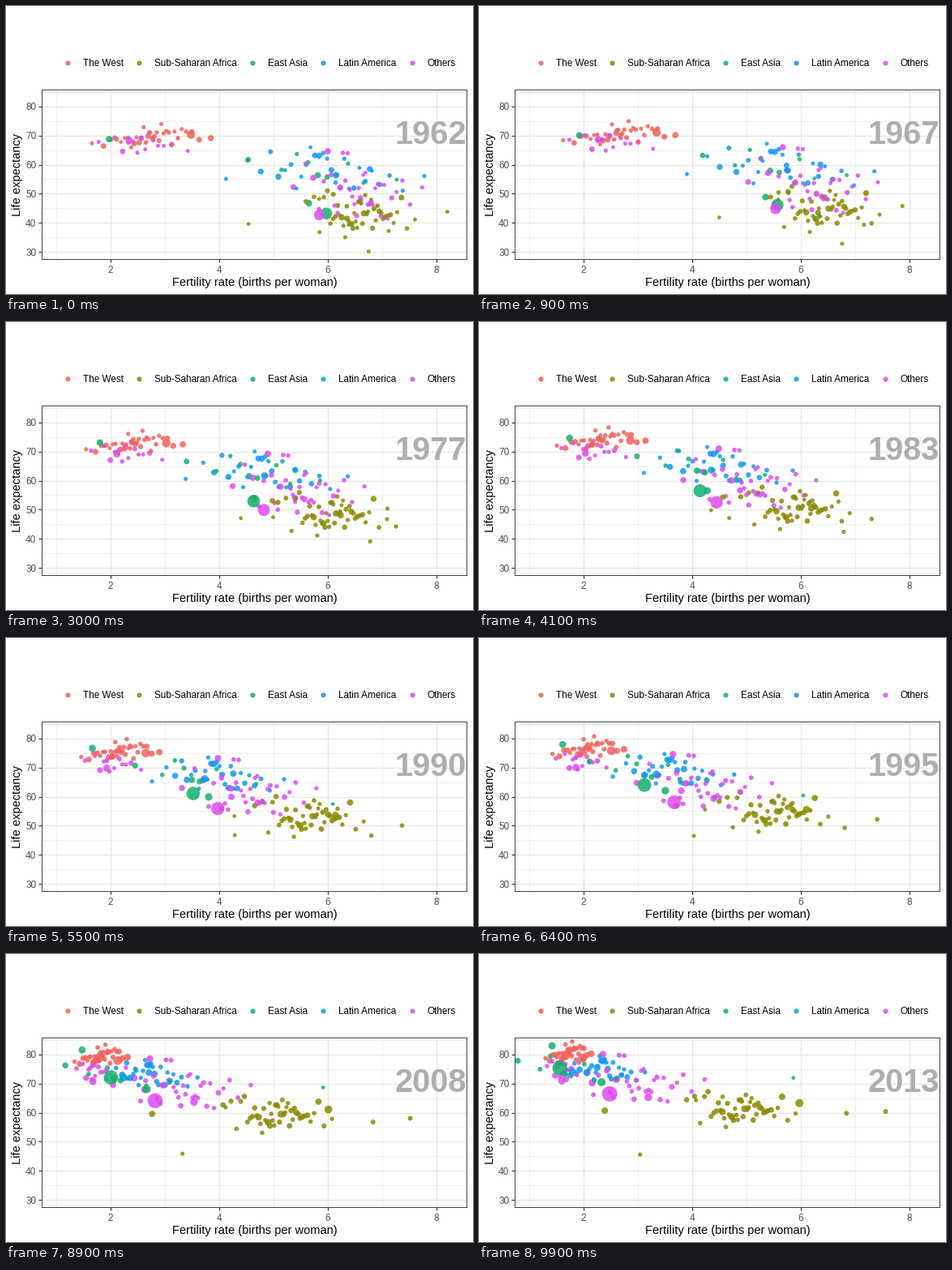
Recreate the animation shown at these times as a matplotlib script. Size 576x355 px, loop 10000 ms.

```python
import matplotlib.pyplot as plt
import numpy as np
from matplotlib.animation import FuncAnimation

W, H, DPI = 576, 355, 100
LEFT, TOP, RIGHT, BOTTOM = 44, 103, 568, 312
FRAMES, INTERVAL = 100, 100
FIRST, LAST = 1962, 2013
PT = 72 / DPI  # points per pixel
ALPHA = 0.85
COLORS = {"west": "#f0625a", "africa": "#8a8900", "east": "#14b06a",
          "latin": "#0f98f2", "others": "#dc4bf0"}

plt.rcParams["font.family"] = "Liberation Sans"
rng = np.random.default_rng(62)
dots = []  # (start, end, (first radius, last radius), color)


def bubble(group, start, end, r0, r1):
    dots.append((start, end, (r0, r1), COLORS[group]))


def cloud(group, count, start, end, spread0, spread1, slope):
    """Small dots that keep their place within the group as it drifts."""
    u = 1.1 * np.arctanh(np.linspace(-0.93, 0.93, count))
    noise = np.clip(rng.normal(size=count), -1.8, 1.8)
    place = np.column_stack([u, slope * u + np.sqrt(1 - slope ** 2) * noise])
    for p in place:
        r = 2.4 + min(rng.exponential(0.4), 1.4)
        bubble(group, start + p * spread0, end + p * spread1, r, 1.1 * r)


cloud("west", 32, (2.75, 70), (1.72, 81), (0.6, 2.2), (0.23, 1.9), 0.1)
cloud("africa", 46, (6.6, 42.8), (4.9, 61), (0.55, 4.6), (0.55, 3.5), -0.15)
cloud("east", 10, (5.9, 59.5), (1.7, 76), (0.75, 4.5), (0.5, 3.8), -0.7)
cloud("latin", 28, (5.95, 58), (2.4, 75), (1, 4.8), (0.4, 2.7), -0.5)
cloud("others", 14, (2.6, 67.3), (1.6, 75.5), (0.45, 2.2), (0.15, 2.2), -0.2)
cloud("others", 34, (6.55, 53), (2.95, 72), (0.65, 6), (0.7, 4.2), -0.2)

# Slow starters and late movers that stand apart from their group.
bubble("africa", (6.75, 30.1), (6.84, 59.8), 2.5, 3)
bubble("africa", (7.12, 37.2), (7.56, 60.4), 2.5, 3)
bubble("africa", (8.2, 43.8), (4.56, 65.5), 2.5, 2.8)
bubble("africa", (4.54, 39.6), (4.07, 64.3), 2.3, 2.6)
bubble("africa", (5.84, 48.2), (3.04, 45.6), 2.4, 2.6)
bubble("africa", (6.1, 49.8), (2.39, 60.7), 3, 4)
bubble("east", (6.38, 39.3), (5.86, 72), 2.3, 2.4)

# Large populations.
bubble("west", (3.48, 70.3), (1.98, 78.8), 5, 5.5)
bubble("africa", (6.35, 41.5), (5.97, 63.3), 3.5, 5)
bubble("east", (5.65, 46.7), (2.33, 70.5), 4, 5)
bubble("east", (1.97, 68.8), (1.42, 83), 4, 4.5)
bubble("latin", (6.15, 56.4), (1.8, 73.9), 4, 4.8)
bubble("latin", (6.77, 58.5), (2.25, 75.5), 3.6, 4.2)
bubble("others", (2.34, 68.4), (1.6, 71), 4.3, 4.5)
bubble("others", (6.6, 48.6), (3.19, 65.3), 3.3, 4.8)
bubble("others", (6.8, 47), (2.16, 70.3), 3.3, 4.5)

# Mix the groups; the two giants go on top.
dots = [dots[i] for i in rng.permutation(len(dots))]
bubble("east", (5.97, 43.2), (1.56, 75.4), 7.3, 9)
bubble("others", (5.84, 42.7), (2.48, 66.5), 6.5, 9.5)
start, end, radii = (np.array([d[k] for d in dots]) for k in range(3))


def area(r):
    return (2 * r * PT) ** 2


fig = plt.figure(figsize=(W / DPI, H / DPI), dpi=DPI, facecolor="white")
ax = fig.add_axes([LEFT / W, 1 - BOTTOM / H,
                   (RIGHT - LEFT) / W, (BOTTOM - TOP) / H])
ax.set(xlim=(0.731, 8.552), ylim=(27.49, 85.86))
ax.set_axisbelow(True)
ax.set_xticks(range(2, 9, 2))
ax.set_xticks(range(1, 9, 2), minor=True)
ax.set_yticks(range(30, 81, 10))
ax.set_yticks(range(35, 86, 10), minor=True)
ax.grid(which="major", color="#e6e6e6", lw=1.3 * PT)
ax.grid(which="minor", color="#ebebeb", lw=0.75 * PT)
ax.tick_params(length=3.67 * PT, width=1.2 * PT, pad=2.9 * PT,
               color="#333333", labelcolor="#4d4d4d", labelsize=11.73 * PT)
ax.tick_params(axis="x", pad=4.2 * PT)
ax.tick_params(which="minor", length=0)
for side in ax.spines.values():
    side.set(color="#444444", linewidth=PT)

# Overlay in pixel units for titles and legend.
stage = fig.add_axes([0, 0, 1, 1], facecolor="none")
stage.set(xlim=(0, W), ylim=(H, 0))
stage.axis("off")


def label(x, y, text, size, **style):
    stage.text(x, y, text, size=size * PT, va="baseline", **style)


label(306.5, 345, "Fertility rate (births per woman)", 14.67, ha="center")
label(18, 208, "Life expectancy", 14.67, ha="center",
      rotation=90, rotation_mode="anchor")
legend = [("west", "The West", 76), ("africa", "Sub-Saharan Africa", 164),
          ("east", "East Asia", 304), ("latin", "Latin America", 391),
          ("others", "Others", 500.5)]
for group, name, x in legend:
    stage.scatter(x, 69.5, s=area(3.1), color=COLORS[group],
                  alpha=ALPHA, linewidths=0)
    label(x + 19, 74, name, 11.73)

year = ax.text(RIGHT / W, 1 - 170.5 / H, "", transform=fig.transFigure,
               size=39.7 * PT, weight="bold", color="#aeaeae",
               ha="right", va="baseline", zorder=1.5)
bubbles = ax.scatter(*start.T, s=area(radii[:, 0]), alpha=ALPHA,
                     c=[d[3] for d in dots], linewidths=0, zorder=2)


def draw(n):
    t = n / (FRAMES - 1)
    bubbles.set_offsets(start + (end - start) * t)
    bubbles.set_sizes(area(radii[:, 0] + (radii[:, 1] - radii[:, 0]) * t))
    year.set_text(str(round(FIRST + (LAST - FIRST) * t)))
    return bubbles, year


anim = FuncAnimation(fig, draw, frames=FRAMES, interval=INTERVAL,
                     repeat=True, repeat_delay=0)
plt.show()
```
